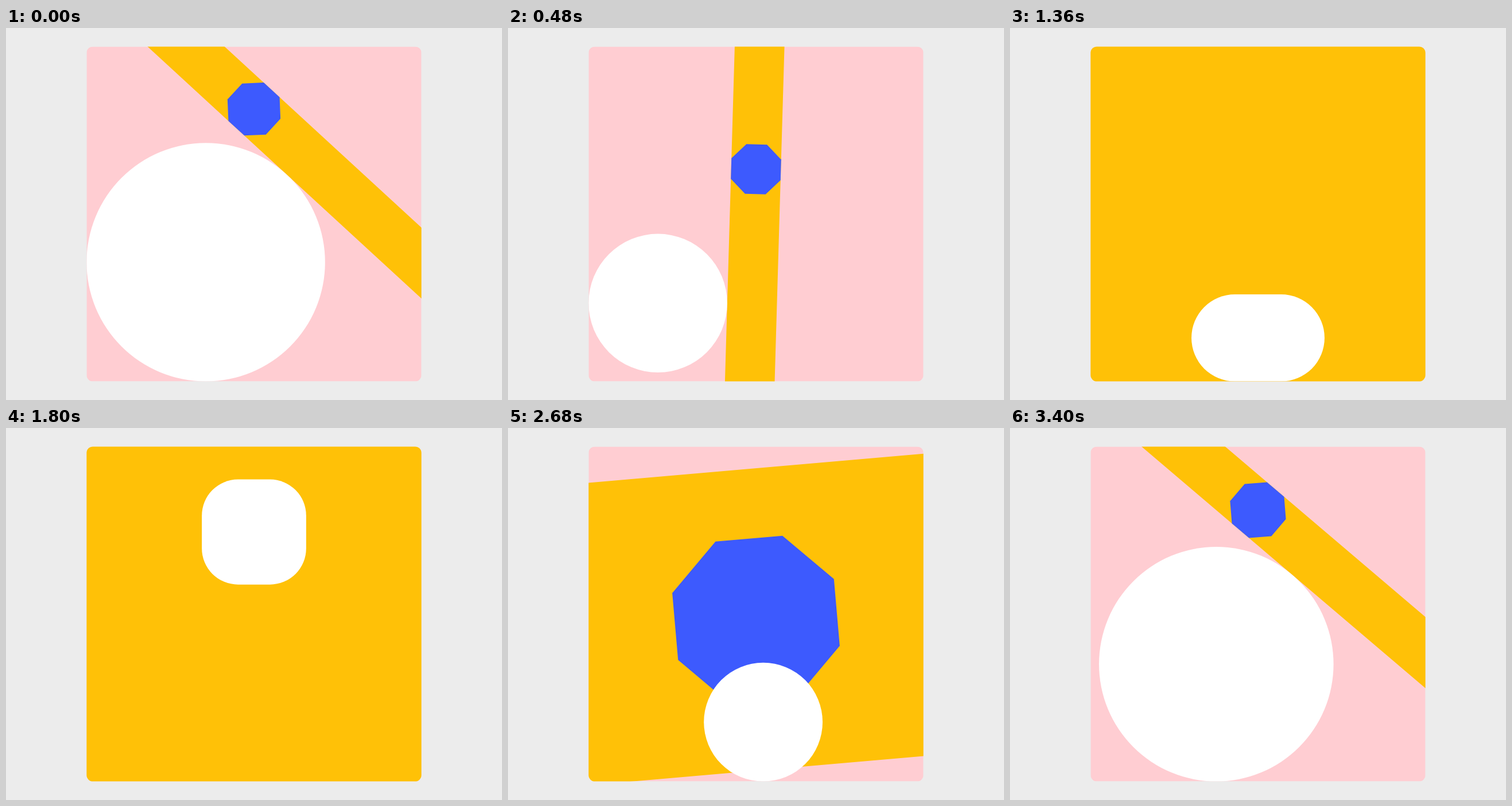
Recreate the animation shown at these times as an HTML page with a canvas. Size 864 by 648 pixels, loop 3440 ms.

```html
<!DOCTYPE html>
<html lang="en">
<head>
<meta charset="utf-8">
<title>Shapes in motion</title>
<style>
  html, body { margin: 0; width: 100%; height: 100%; overflow: hidden; background: #ececec; }
  canvas { display: block; width: 864px; height: 648px; }
</style>
</head>
<body>
<canvas id="stage" width="864" height="648"></canvas>
<script>
const LOOP = 3440, STEP = 40;
const GREY = '#ececec', PINK = '#ffcdd2', YELLOW = '#ffc107', BLUE = '#3d5afe', WHITE = '#fff';
const BOX = { x: 140.4, y: 32.4, s: 583.2, r: 11 };
const FLOOR = BOX.y + BOX.s, MID = 432, RAD = Math.PI / 180;

// Scene changes. Times below zero belong to the end of the loop.
const OPEN = -900, ROLL = -820, WEDGE = -440, FLING = 480, TOP = 800, LAND = 1120;
const JUMP = 1459, HANG = 471, DROP = JUMP + 2 * HANG, SETTLE = 220;

const g = document.getElementById('stage').getContext('2d');
const mix = (a, b, p) => a + (b - a) * p;
const part = (t, from, to) => Math.max(0, Math.min(1, (t - from) / (to - from)));

// Smooth curve without overshoot through [time, value] pairs.
function curve(...keys) {
  const n = keys.length;
  const slope = i => (keys[i + 1][1] - keys[i][1]) / (keys[i + 1][0] - keys[i][0]);
  const tan = keys.map((k, i) => {
    if (i === 0 || i === n - 1) return 0;
    const a = slope(i - 1), b = slope(i);
    return a * b <= 0 ? 0 : 2 * a * b / (a + b);
  });
  return t => {
    if (t <= keys[0][0]) return keys[0][1];
    if (t >= keys[n - 1][0]) return keys[n - 1][1];
    let i = 0;
    while (t > keys[i + 1][0]) i++;
    const [t0, v0] = keys[i], [t1, v1] = keys[i + 1];
    const d = t1 - t0, p = (t - t0) / d, q = 1 - p;
    return v0 * (1 + 2 * p) * q * q + v1 * (3 - 2 * p) * p * p
      + d * p * q * (tan[i] * q - tan[i + 1] * p);
  };
}

const tilt = curve([OPEN, 0], [WEDGE, -22.4], [-40, 40.4], [0, 42.6],
  [FLING, 91.67], [760, 230], [TOP, 243.6]);
const half = curve([OPEN, 300], [WEDGE, 102.5], [-40, 47.2], [0, 45.4], [FLING, 43.3], [620, 4.5]);
const octX = curve([FLING, MID], [670, 322], [760, 350], [TOP, 378.4]);
const octY = curve([OPEN, 324], [WEDGE, 367], [-40, 143], [0, 141.2],
  [FLING, 246], [760, 90.5], [TOP, 83.8]);
const rollX = curve([ROLL, MID], [WEDGE, 620], [-40, 359.3], [0, 348.3]);
const flingX = curve([FLING, 261.5], [660, 330], [760, 399.5], [TOP, 410]);
const flingY = curve([FLING, 479], [760, 149.5], [TOP, 147.5]);

const angle = u => (tilt(u) + Math.max(0, u - TOP) * 0.335) * RAD;

// Ball squeezed between the bar, the floor and a wall.
function wedge(u) {
  const a = angle(u), nx = -Math.sin(a), ny = Math.cos(a);
  const b = FLOOR - 15.6 * part(u, 200, FLING) ** 2;
  const gap = ny * (b - octY(u)) - half(u);
  const r = u < WEDGE ? 103.4
    : u < 0 ? (nx * (rollX(u) - MID) + gap) / (1 + ny)
    : (nx * (BOX.x - MID) + gap) / (1 + ny - nx);
  return { x: u < 0 ? rollX(u) : BOX.x + r, y: b - r, r };
}

function ball(u) {
  if (u <= FLING) return wedge(u);
  const q = part(u, TOP, LAND);
  return {
    x: flingX(u) + 22 * q + 98 * Math.sin(Math.PI * q),
    y: flingY(u) + 366 * q * q,
    r: 102.3 + 18.7 * (1 - part(u, FLING, 700)) ** 2
  };
}

function octagon(u) {
  const a = angle(u);
  let x = octX(u), y = octY(u);
  if (u > TOP) {
    const c = ball(u), len = 71 * (1 - part(u, TOP, LAND) ** 3);
    x = c.x + len * Math.cos(a);
    y = c.y + len * Math.sin(a);
  }
  const size = part(u, OPEN, -640) * (1 - part(u, 1000, LAND));
  const r = (u <= FLING ? half(u) : 43) / Math.cos(22.5 * RAD) * size;
  const pts = Array.from({ length: 8 }, (_, i) => {
    const v = a + (i * 45 + 22.5) * RAD;
    return [x + r * Math.cos(v), y + r * Math.sin(v)];
  });
  return { x, y, pts };
}

// Resting disc at p = 0, squashed on the way, stretched for flight at p = 1.
function squash(p) {
  const dip = Math.sin(Math.PI * p), pull = p ** 4;
  const w = mix(206, 154, pull) + 49 * dip, h = mix(206, 277, pull) - 91 * dip;
  return { w, h, b: FLOOR, r: Math.min(w, h) / 2 };
}

function flight(t) {
  const s = Math.abs(t - JUMP - HANG) / HANG, speed = s ** 3.5;
  const w = 182 - 28 * speed, h = 182 + 95 * speed;
  return { w, h, b: FLOOR - 344 * (1 - s ** 4.5), r: mix(w / 2, 27, part(t, JUMP, 2240)) };
}

function blob(t) {
  if (t < JUMP) return squash(part(t, LAND, JUMP));
  if (t < DROP) return flight(t);
  const q = part(t, DROP, DROP + SETTLE), s = squash(1 - q);
  return { ...s, r: mix(27, s.r, Math.min(1, q * 2)) };
}

function hull(pts) {
  const side = list => {
    const out = [];
    for (const p of list) {
      while (out.length > 1) {
        const [a, b] = out.slice(-2);
        if ((b[0] - a[0]) * (p[1] - a[1]) - (b[1] - a[1]) * (p[0] - a[0]) > 0) break;
        out.pop();
      }
      out.push(p);
    }
    return out.slice(0, -1);
  };
  const s = pts.slice().sort((p, q) => p[0] - q[0] || p[1] - q[1]);
  return side(s).concat(side(s.slice().reverse()));
}

function fill(color, path) {
  g.fillStyle = color;
  g.beginPath();
  path();
  g.fill();
}

const disc = (color, x, y, r) => fill(color, () => g.arc(x, y, r, 0, 7));
const rect = (color, x, y, w, h) => fill(color, () => g.rect(x, y, w, h));
const poly = (color, pts) => fill(color, () => pts.forEach(p => g.lineTo(...p)));

function line(color, x0, y0, x1, y1, w) {
  g.strokeStyle = color;
  g.lineWidth = w;
  g.lineCap = 'round';
  g.beginPath();
  g.moveTo(x0, y0);
  g.lineTo(x1, y1);
  g.stroke();
}

function drawBlob(t) {
  const { w, h, b, r } = blob(t);
  fill(WHITE, () => g.roundRect(MID - w / 2, b - h, w, h, Math.min(r, w / 2, h / 2)));
}

function drawBar(u) {
  const o = octagon(u), a = angle(u);
  const dx = Math.cos(a) * 1200, dy = Math.sin(a) * 1200;
  line(YELLOW, o.x - dx, o.y - dy, o.x + dx, o.y + dy, half(u) * 2);
  poly(BLUE, o.pts);
}

// The bar shrinks to a rod that links the octagon and the ball; both smear.
function drawFling(u) {
  const o = octagon(u), c = ball(u), o0 = octagon(u - STEP), c0 = ball(u - STEP);
  const a = angle(u), k = part(u, FLING, 600), far = 900 * (1 - k) ** 2;
  const ux = Math.cos(a), uy = Math.sin(a), out = far + 4 * k;
  line(WHITE, c0.x, c0.y, c.x, c.y, c.r * 2);
  poly(BLUE, hull(o.pts.concat(o0.pts)));
  line(YELLOW, o.x + ux * out, o.y + uy * out,
    mix(o.x, c.x, k) - ux * far, mix(o.y, c.y, k) - uy * far, half(u) * 2);
}

function draw(t) {
  const u = t >= LOOP + OPEN ? t - LOOP : t;
  rect(GREY, 0, 0, 864, 648);
  g.save();
  g.beginPath();
  g.roundRect(BOX.x, BOX.y, BOX.s, BOX.s, BOX.r);
  g.clip();
  rect(PINK, BOX.x, BOX.y, BOX.s, BOX.s);
  if (u <= FLING) {
    drawBar(u);
    const c = ball(u);
    if (u < ROLL) drawBlob(t);
    else disc(WHITE, c.x, c.y, c.r);
  } else if (u < LAND) {
    drawFling(u);
  } else {
    disc(YELLOW, MID, 514, 700 * part(u, LAND, 1320));
    drawBlob(t);
  }
  g.restore();
}

const start = performance.now();
function tick() {
  const t = (performance.now() - start) % LOOP;
  draw(Math.floor(t / STEP) * STEP);
  requestAnimationFrame(tick);
}
tick();
</script>
</body>
</html>
```
